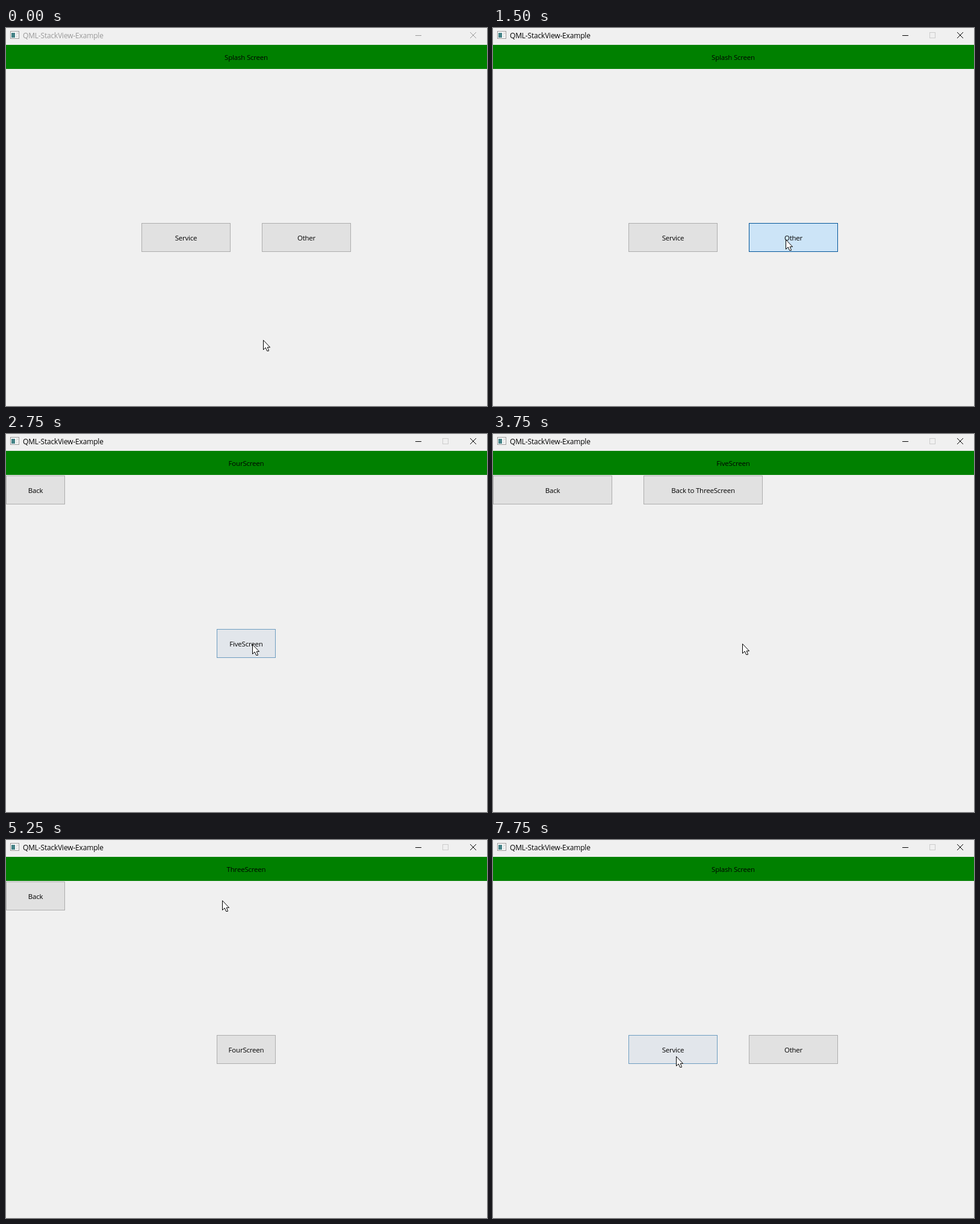
Animation, 799 px wide and 628 px high, one loop 8 s. Source, as an HTML page:

```html
<!DOCTYPE html>
<html lang="en">
<head>
<meta charset="utf-8">
<title>QML-StackView-Example</title>
<style>
html, body { margin: 0; width: 100%; height: 100%; overflow: hidden; background: #f0f0f0; }
svg { display: block; width: 799px; height: 628px; }
text { font: 11.5px "Open Sans", "Noto Sans", sans-serif; letter-spacing: -.2px; text-anchor: middle; }
.title { font-size: 12px; letter-spacing: -.18px; text-anchor: start; }
.btn { fill: #e1e1e1; stroke: #adadad; }

/* Every change is hard, on a 250 ms beat (3.125%) */
.window, .page, .btn, .cursor { animation: 8s step-end infinite; }

.window { animation-name: window; }
@keyframes window { 0% { opacity: 0 } 18.75%, 100% { opacity: 1 } }
.idle { animation-name: idle; }
@keyframes idle { 0% { opacity: 1 } 18.75%, 100% { opacity: 0 } }

.splash { animation-name: splash; }
.three { animation-name: three; }
.four { animation-name: four; }
.five { animation-name: five; }
@keyframes splash { 0%, 90.625%, 100% { opacity: 1 } 21.875% { opacity: 0 } }
@keyframes three { 0%, 34.375%, 90.625%, 100% { opacity: 0 } 21.875%, 65.625% { opacity: 1 } }
@keyframes four { 0%, 43.75%, 100% { opacity: 0 } 34.375% { opacity: 1 } }
@keyframes five { 0%, 65.625%, 100% { opacity: 0 } 43.75% { opacity: 1 } }

/* Button states: fading in, hovered, pressed */
.to-service { animation-name: to-service; }
.to-other { animation-name: to-other; }
.to-four { animation-name: to-four; }
.to-five { animation-name: to-five; }
.to-three { animation-name: to-three; }
.to-splash { animation-name: to-splash; }
@keyframes to-service {
  0%, 15.625% { fill: #e1e1e1; stroke: #adadad }
  9.375%, 96.875%, 100% { fill: #e2e6eb; stroke: #6c9cc0 }
  12.5% { fill: #e5f1fb; stroke: #0078d7 }
}
@keyframes to-other {
  0%, 21.875%, 100% { fill: #e1e1e1; stroke: #adadad }
  15.625% { fill: #e2e6eb; stroke: #6c9cc0 }
  18.75% { fill: #cce4f7; stroke: #005499 }
}
@keyframes to-four {
  0%, 34.375%, 100% { fill: #e1e1e1; stroke: #adadad }
  25% { fill: #e2e6eb; stroke: #6c9cc0 }
  28.125% { fill: #e5f1fb; stroke: #0078d7 }
  31.25% { fill: #cce4f7; stroke: #005499 }
}
@keyframes to-five {
  0%, 43.75%, 100% { fill: #e1e1e1; stroke: #adadad }
  34.375% { fill: #e2e6eb; stroke: #6c9cc0 }
  37.5% { fill: #e5f1fb; stroke: #0078d7 }
  40.625% { fill: #cce4f7; stroke: #005499 }
}
@keyframes to-three {
  0%, 65.625%, 100% { fill: #e1e1e1; stroke: #adadad }
  56.25% { fill: #e2e6eb; stroke: #6c9cc0 }
  59.375% { fill: #e5f1fb; stroke: #0078d7 }
  62.5% { fill: #cce4f7; stroke: #005499 }
}
@keyframes to-splash {
  0%, 90.625%, 100% { fill: #e1e1e1; stroke: #adadad }
  78.125% { fill: #e2e6eb; stroke: #6c9cc0 }
  81.25% { fill: #e5f1fb; stroke: #0078d7 }
  87.5% { fill: #cce4f7; stroke: #005499 }
}

.cursor { animation-name: cursor; }
@keyframes cursor {
  0% { transform: translate(427px, 518px) }
  3.125% { transform: translate(424px, 508px) }
  6.25% { transform: translate(371px, 438px) }
  9.375% { transform: translate(312px, 362px) }
  12.5% { transform: translate(342px, 354px) }
  15.625% { transform: translate(478px, 360px) }
  18.75% { transform: translate(486px, 351px) }
  21.875% { transform: translate(478px, 351px) }
  25% { transform: translate(440px, 350px) }
  28.125% { transform: translate(412px, 349px) }
  31.25% { transform: translate(409px, 349px) }
  46.875% { transform: translate(414px, 348px) }
  50% { transform: translate(411px, 292px) }
  53.125% { transform: translate(391px, 170px) }
  56.25% { transform: translate(368px, 84px) }
  59.375% { transform: translate(361px, 98px) }
  62.5% { transform: translate(359px, 100px) }
  68.75% { transform: translate(346px, 102px) }
  71.875% { transform: translate(236px, 104px) }
  75% { transform: translate(116px, 98px) }
  78.125% { transform: translate(65px, 97px) }
  81.25% { transform: translate(62px, 97px) }
  84.375% { transform: translate(61px, 97px) }
  90.625% { transform: translate(76px, 106px) }
  93.75% { transform: translate(262px, 249px) }
  96.875%, 100% { transform: translate(304px, 359px) }
}
</style>
</head>
<body>
<svg viewBox="0 0 799 628">
  <defs>
    <g id="controls" fill="none">
      <path d="M680 12.5h10" stroke="currentColor"/>
      <path d="M771 7l10 10m0-10l-10 10" stroke="currentColor"/>
    </g>
  </defs>
  <rect width="799" height="628" fill="#f0f0f0"/>

  <rect x="7.5" y="5.5" width="14" height="12" fill="#fafafa" stroke="#999"/>
  <rect x="9" y="8" width="6" height="8" fill="#458387"/>
  <path d="M17 8.5h3m-3 3h2m-2 3h2" stroke="#b5b5b5"/>
  <g class="window idle" color="#999">
    <text class="title" x="28" y="17" fill="#999">QML-StackView-Example</text>
    <use href="#controls"/>
  </g>
  <g class="window" color="#000">
    <text class="title" x="28" y="17">QML-StackView-Example</text>
    <rect x="725.5" y="7.5" width="9" height="9" fill="none" stroke="#ccc"/>
    <use href="#controls"/>
  </g>

  <rect y="28" width="799" height="40" fill="#008000"/>

  <g class="page splash">
    <text x="399" y="53">Splash Screen</text>
    <rect class="btn to-service" x="225.5" y="324.5" width="147" height="47"/>
    <text x="299" y="353">Service</text>
    <rect class="btn to-other" x="425.5" y="324.5" width="147" height="47"/>
    <text x="499" y="353">Other</text>
  </g>

  <g class="page three">
    <text x="399" y="53">ThreeScreen</text>
    <rect class="btn to-splash" x=".5" y="69.5" width="97" height="47"/>
    <text x="49" y="98">Back</text>
    <rect class="btn to-four" x="350.5" y="324.5" width="97" height="47"/>
    <text x="399" y="353">FourScreen</text>
  </g>

  <g class="page four">
    <text x="399" y="53">FourScreen</text>
    <rect class="btn" x=".5" y="69.5" width="97" height="47"/>
    <text x="49" y="98">Back</text>
    <rect class="btn to-five" x="350.5" y="324.5" width="97" height="47"/>
    <text x="399" y="353">FiveScreen</text>
  </g>

  <g class="page five">
    <text x="399" y="53">FiveScreen</text>
    <rect class="btn" x=".5" y="69.5" width="197" height="47"/>
    <text x="99" y="98">Back</text>
    <rect class="btn to-three" x="250.5" y="69.5" width="197" height="47"/>
    <text x="349" y="98">Back to ThreeScreen</text>
  </g>

  <path class="cursor" d="M.5 .7V16.5L4.2 13 6.6 18.5H9.3V17.2L7.2 12.4H11.6z" fill="#fff" stroke="#000"/>
</svg>
</body>
</html>
```
